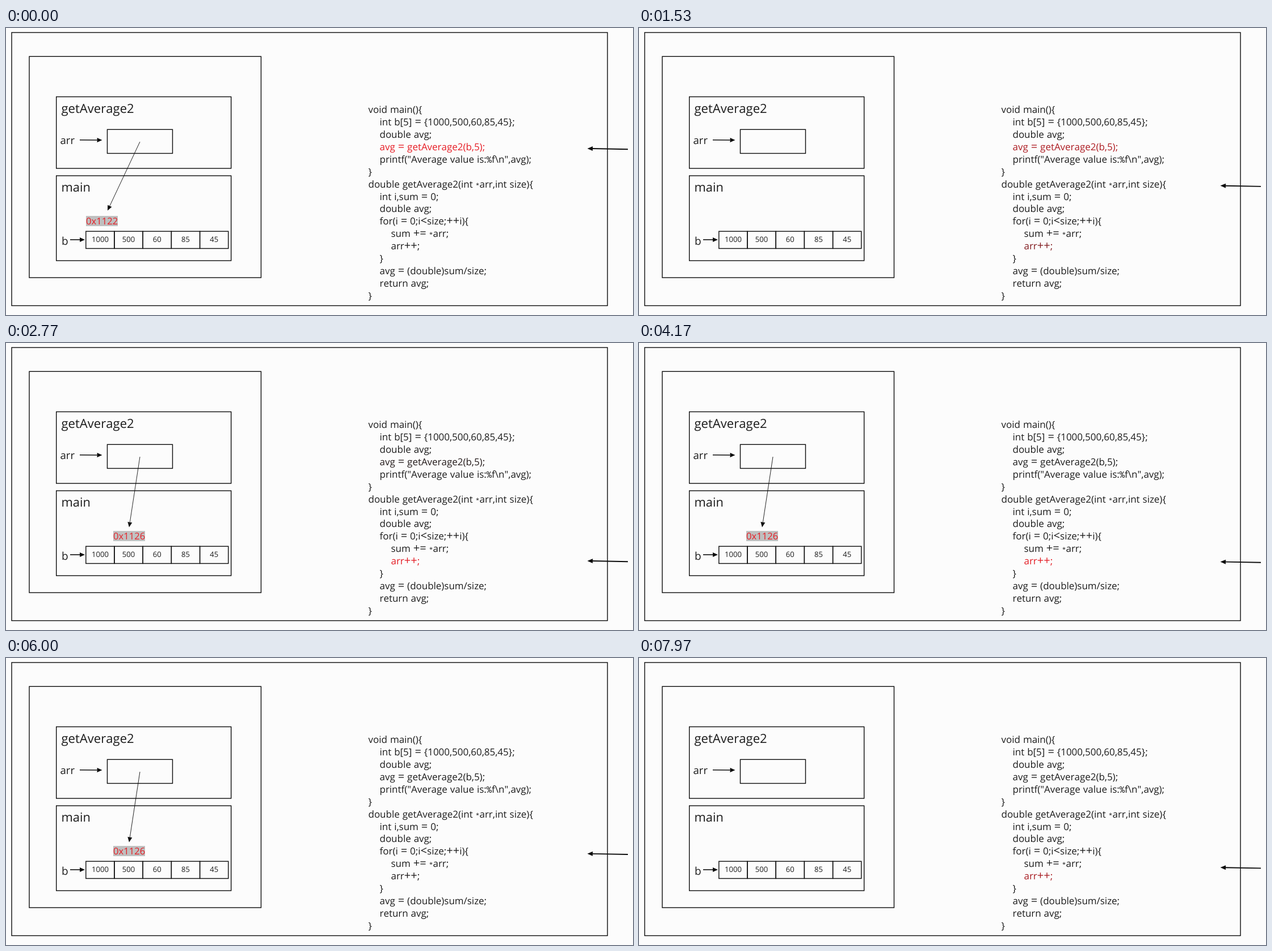
These frames come from a looping animation (1105x507 px, 8 s). An HTML page:

```html
<!DOCTYPE html>
<html lang="en">
<head>
<meta charset="utf-8">
<title>Array pointer walk</title>
<style>
  html, body { margin: 0; width: 100%; height: 100%; overflow: hidden; background: #fcfcfc; }
  svg { display: block; width: 1105px; height: 507px; }
  text {
    font-family: "Open Sans", "Noto Sans", sans-serif; font-kerning: none;
    fill: #1c1c1c; text-rendering: geometricPrecision;
  }
  .code { font-size: 16.95px; word-spacing: 0.6px; }
  .operator { font-size: 20px; }
  .percent { font: 15.5px "Noto Sans Mono", monospace; }
  .star { font: 11.5px "Noto Sans Mono", monospace; }
</style>
</head>
<body>
<svg id="stage" viewBox="0 0 1105 507"></svg>
<script>
const LOOP = 8000, MORPH = 2000, RED = [230, 30, 38], INK = '#0c0c0c';
const CODE = String.raw`void main(){
 int b[5] = {1000,500,60,85,45};
 double avg;
 avg = getAverage2(b,5);
 printf("Average value is:%f\n",avg);
}
double getAverage2(int *arr,int size){
 int i,sum = 0;
 double avg;
 for(i = 0;i<size;++i){
  sum += *arr;
  arr++;
 }
 avg = (double)sum/size;
 return avg;
}`.split('\n');

const stage = document.getElementById('stage');

function add(tag, attrs, parent = stage) {
  const el = document.createElementNS('http://www.w3.org/2000/svg', tag);
  for (const k in attrs) el.setAttribute(k, attrs[k]);
  return parent.appendChild(el);
}

function label(str, x, y, size, attrs = {}, parent = stage) {
  const el = add('text', { x, y, 'font-size': size, ...attrs }, parent);
  el.textContent = str;
  return el;
}

// Symbols have their own proportions
function codeLine(src, row) {
  const str = src.trimStart();
  const el = add('text', { class: 'code', x: 638.5 + (src.length - str.length) * 20, y: 150 + row * 21.93 });
  for (const part of str.split(/([=+<]+|%|\*)/)) {
    const kind = part === '%' ? 'percent' : part === '*' ? 'star' : /^[=+<]/.test(part) ? 'operator' : '';
    add('tspan', { class: kind }, el).textContent = part;
  }
  return el;
}

function box(x1, y1, x2, y2) {
  add('rect', { x: x1, y: y1, width: x2 - x1, height: y2 - y1, fill: 'none', stroke: INK, 'stroke-width': 1.4 });
}

function arrow(x1, y1, x2, y2, width, head, half, parent = stage) {
  const len = Math.hypot(x2 - x1, y2 - y1);
  const ux = (x2 - x1) / len, uy = (y2 - y1) / len;
  const bx = x2 - ux * head, by = y2 - uy * head;
  add('line', { x1, y1, x2: bx, y2: by, stroke: INK, 'stroke-width': width }, parent);
  add('path', {
    d: `M${x2} ${y2}L${bx - uy * half} ${by + ux * half}L${bx + uy * half} ${by - ux * half}Z`, fill: INK
  }, parent);
}

function pointer(address, left, tipX, tipY) {
  const g = add('g', {});
  arrow(236, 201, tipX, tipY, 0.9, 9, 4, g);
  add('rect', { x: left, y: 332, width: 56, height: 18, fill: '#bfbfbf' }, g);
  label(address, left, 347, 16.6, { style: `fill: rgb(${RED})` }, g);
  return g;
}

// Memory diagram
box(10, 8, 1060, 490.5);
box(41, 50.3, 449.5, 441);
box(88.7, 121.5, 396.7, 248);
box(88.7, 261, 396.7, 411);
box(178.5, 179.3, 293.5, 221.5);
label('getAverage2', 97.5, 149.5, 22.1);
label('main', 97.5, 289, 21.8);
label('arr', 95.5, 205, 18.6);
label('b', 98, 382.5, 19);
arrow(130, 197.7, 169.5, 198, 1.6, 9, 4);
arrow(113, 374, 139, 374, 1.6, 9, 4);
[1000, 500, 60, 85, 45].forEach((n, i) => {
  const x = 140.8 + i * 50.2;
  box(x, 359.2, x + 50.2, 389.5);
  label(n, x + 25.1, 378, 13.1, { 'text-anchor': 'middle' });
});

const lines = CODE.map(codeLine);
const callLine = lines[3], stepLine = lines[11];

const first = pointer('0x1122', 141, 179, 322.5);
const second = pointer('0x1126', 189, 217, 325.5);
const cursor = add('g', {});
arrow(1096, 1.3, 1024.5, 0, 1.9, 9.5, 4, cursor);

const clamp = v => Math.max(0, Math.min(1, v));
const bez = (a, b, s) => 3 * a * s * (1 - s) ** 2 + 3 * b * s * s * (1 - s) + s ** 3;

function ease(u) {
  if (u <= 0 || u >= 1) return clamp(u);
  let lo = 0, hi = 1;
  for (let i = 0; i < 24; i++) {
    const mid = (lo + hi) / 2;
    if (bez(0.25, 0.42, mid) < u) lo = mid; else hi = mid;
  }
  return bez(0.19, 1, lo);
}

function tint(el, amount) {
  const w = clamp(amount) ** 0.7;
  el.style.fill = `rgb(${RED.map(c => Math.round(28 + (c - 28) * w))})`;
}

function draw(t) {
  const [a, b, c] = [1010, 4140, 7190].map(start => ease((t - start) / MORPH));
  const y = 212.9 + 174.1 * a - 41.5 * b + 41.5 * c;
  cursor.setAttribute('transform', `translate(0 ${y})`);
  tint(callLine, 1 - a);
  tint(stepLine, a - b + c);
  first.setAttribute('opacity', clamp(1 - 3 * a));
  second.setAttribute('opacity', clamp(Math.min(3 * a - 2, 1 - 3 * c)));
}

const begin = performance.now();
function tick() {
  draw((performance.now() - begin) % LOOP);
  requestAnimationFrame(tick);
}
tick();
</script>
</body>
</html>
```
